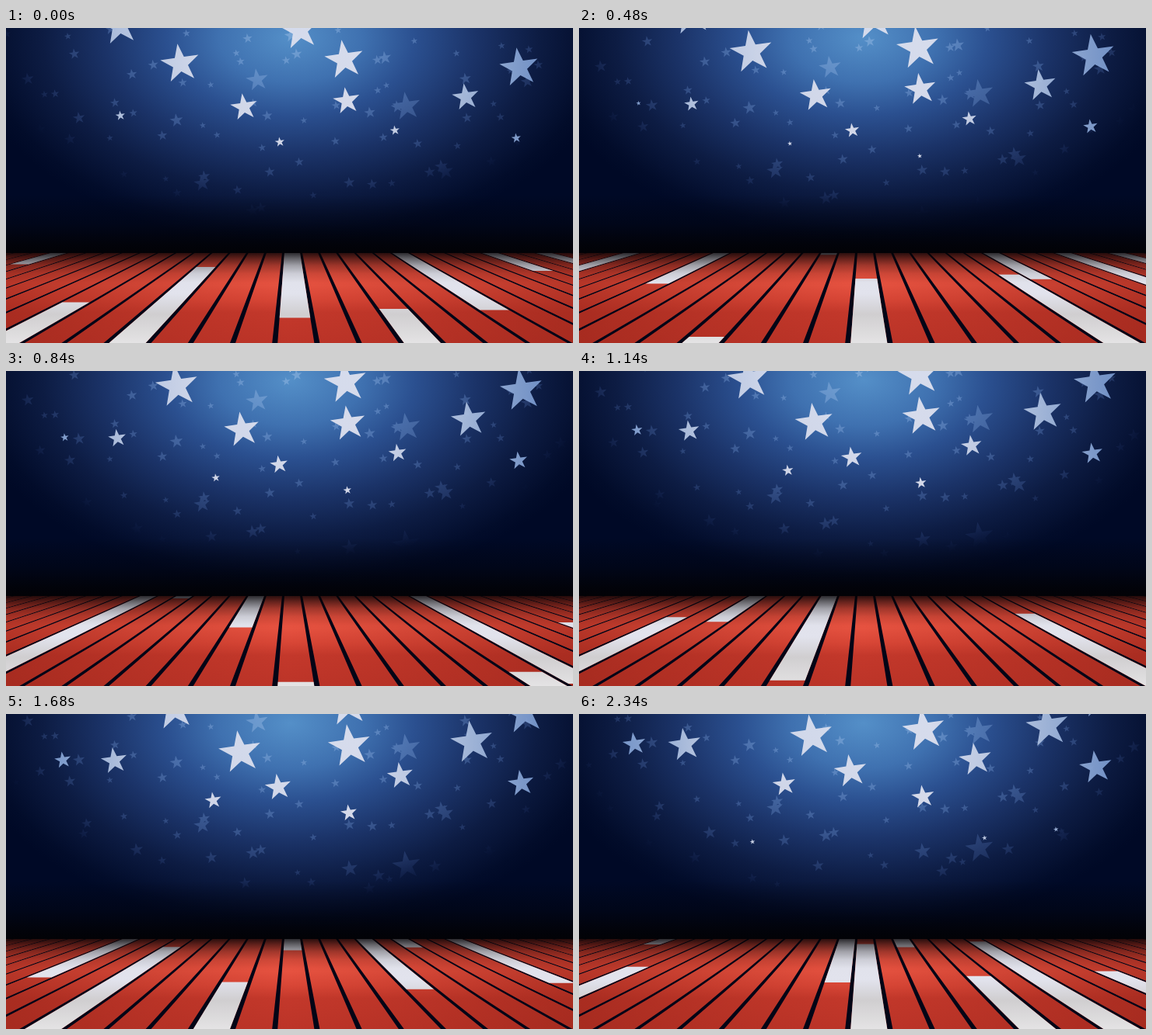
Write an HTML page with a canvas that moves like this. It is 729 by 406 pixels and loops after 2400 ms.

```html
<!DOCTYPE html>
<html lang="en">
<head>
<meta charset="utf-8">
<title>Stars and planks</title>
<style>
html, body { margin: 0; width: 100%; height: 100%; overflow: hidden; background: #000; }
canvas { display: block; }
</style>
</head>
<body>
<canvas id="stage" width="729" height="406"></canvas>
<script>
const W = 729, H = 406, LOOP = 2400, STEP = 60, HORIZON = 290;
const ctx = document.getElementById('stage').getContext('2d');

// Bright stars come in waves; each wave starts the loop at its own size.
const brightWaves = [
  { size: 26, at: [[146, -3], [378, 3], [224, 46], [435, 41], [660, 51]] },
  { size: 18, at: [[306, 102], [438, 94], [591, 89]] },
  { size: 6.5, at: [[147, 113], [352, 147], [500, 132], [656, 142]] },
  { size: 0, at: [[78, 112], [273, 164], [437, 180]] },
  { size: -12, at: [[511, 233], [602, 222], [234, 238]] }
];

// White tiles leave the horizon in evenly spaced waves; each entry is a lane.
const tileWaves = [
  [3, -7], [-4], [0, 6], [11, 14, -13], [-8, 7], [-2],
  [-6], [4, 9, -9], [0, 6], [-1], [2, -11]
];
const TILE = { first: -1311, every: 352, stagger: 40, length: 750 };

function seeded(seed) {
  return () => (seed = (seed * 16807) % 2147483647) / 2147483647;
}

// Small stars are scattered one per cell; a few large ones are placed.
function scatterStars() {
  const random = seeded(2024);
  const stars = [[323, 67, 15], [515, 101, 19], [515, 252, 19], [252, 200, 11], [565, 185, 11], [442, 256, 11]];
  const cols = 12, rows = 9;
  for (let i = 0; i < cols * rows; i++) {
    const x = (i % cols + random()) * W / cols;
    const y = (Math.floor(i / cols) + random()) * 300 / rows;
    stars.push([x, y, 4.2 + 4.8 * random() ** 1.3]);
  }
  return stars;
}
const faintStars = scatterStars();

function blend(gradient, stops) {
  for (const [at, color] of stops) gradient.addColorStop(at, color);
  return gradient;
}
const radial = (r, stops) => blend(ctx.createRadialGradient(0, 0, 0, 0, 0, r), stops);
const vertical = (y0, y1, stops) => blend(ctx.createLinearGradient(0, y0, 0, y1), stops);
const horizontal = stops => blend(ctx.createLinearGradient(0, 0, W, 0), stops);

const skyFill = radial(265, [
  [0, 'rgb(84,143,200)'], [0.22, 'rgb(63,113,176)'], [0.38, 'rgb(43,80,144)'],
  [0.57, 'rgb(27,51,104)'], [0.76, 'rgb(13,28,67)'], [0.94, 'rgb(2,12,42)'], [1, 'rgb(0,9,38)']
]);
const duskFill = vertical(215, HORIZON, [
  [0, 'rgba(2,2,6,0)'], [0.5, 'rgba(2,2,6,.4)'], [0.85, 'rgba(2,2,6,.88)'], [1, 'rgb(2,2,6)']
]);
const faintFill = radial(245, [
  [0, 'rgba(155,190,230,.5)'], [0.35, 'rgba(125,162,215,.45)'], [0.65, 'rgba(95,130,190,.4)'],
  [0.85, 'rgba(75,105,170,.28)'], [1, 'rgba(50,75,150,0)']
]);
const brightFill = horizontal([
  [0, 'rgba(110,150,215,.85)'], [0.1, 'rgba(140,170,218,.9)'], [0.2, 'rgba(188,203,230,.92)'],
  [0.34, 'rgba(216,221,237,.95)'], [0.62, 'rgba(222,225,239,.95)'], [0.8, 'rgba(178,196,226,.92)'],
  [0.91, 'rgba(136,166,215,.9)'], [1, 'rgba(110,150,215,.85)']
]);
const redFill = vertical(HORIZON, H, [
  [0, 'rgb(222,74,57)'], [0.36, 'rgb(230,82,64)'], [0.52, 'rgb(216,70,54)'],
  [0.66, 'rgb(195,56,43)'], [1, 'rgb(188,52,40)']
]);
const sideFill = horizontal([
  [0, 'rgba(155,38,27,.65)'], [0.35, 'rgba(165,42,30,.18)'], [0.5, 'rgba(170,45,30,0)'],
  [0.65, 'rgba(165,42,30,.18)'], [1, 'rgba(155,38,27,.65)']
]);
const whiteFill = vertical(HORIZON, H, [
  [0, 'rgb(222,223,232)'], [0.45, 'rgb(226,227,237)'], [0.68, 'rgb(208,206,208)'], [1, 'rgb(228,227,228)']
]);
const shadowFill = vertical(HORIZON, 328, [
  [0, 'rgba(4,2,5,.82)'], [0.2, 'rgba(4,2,5,.55)'], [0.42, 'rgba(4,2,5,.29)'],
  [0.7, 'rgba(4,2,5,.09)'], [1, 'rgba(4,2,5,0)']
]);

function addStar(x, y, r) {
  for (let i = 0; i < 10; i++) {
    const a = (-98 + i * 36) * Math.PI / 180;
    const d = i % 2 ? r * 0.39 : r;
    ctx[i ? 'lineTo' : 'moveTo'](x + d * Math.cos(a), y + d * Math.sin(a));
  }
  ctx.closePath();
}

function fillPath(fill) {
  ctx.fillStyle = fill;
  ctx.fill();
}

// Fills the current path with a radial gradient stretched to an ellipse.
function fillOval(fill, y) {
  ctx.save();
  ctx.translate(366, y);
  ctx.scale(1.58, 1);
  fillPath(fill);
  ctx.restore();
}

function laneX(line, y) {
  const p = (y - HORIZON) / (H - HORIZON);
  return 368 + 4.8 * p + (line - 0.5) * (23.1 + 31.1 * p);
}

function addPlank(lane, top, bottom) {
  const left = lane + 0.065, right = lane + 0.935;
  ctx.moveTo(laneX(left, top), top);
  ctx.lineTo(laneX(right, top), top);
  ctx.lineTo(laneX(right, bottom), bottom);
  ctx.lineTo(laneX(left, bottom), bottom);
  ctx.closePath();
}

// Constant speed in depth, projected onto the screen.
function floorY(age) {
  const depth = 0.01094 - 8.6e-6 * Math.max(0, age);
  return depth < 0.00482 ? H : Math.min(H, 198.6 + 1 / depth);
}

function drawSky(t) {
  ctx.beginPath();
  ctx.rect(0, 0, W, H);
  fillOval(skyFill, 12);
  ctx.beginPath();
  for (const [x, y, r] of faintStars) addStar(x, y - 0.0337 * t, r);
  fillOval(faintFill, 0);
  ctx.fillStyle = duskFill;
  ctx.fillRect(0, 215, W, H - 215);

  for (const { size, at } of brightWaves) {
    const r = Math.min(28.5, size + 0.0066 * t);
    if (r <= 0) continue;
    for (const [x, y] of at) {
      const drift = 12 * Math.sin((x - 380) / 120) * t / LOOP;
      ctx.beginPath();
      addStar(x + drift, y - 0.0313 * t, r);
      fillPath(brightFill);
    }
  }
}

function drawFloor(t) {
  ctx.fillStyle = 'rgb(2,5,22)';
  ctx.fillRect(0, HORIZON, W, H - HORIZON);
  ctx.beginPath();
  for (let lane = -17; lane <= 17; lane++) addPlank(lane, HORIZON, H);
  fillPath(redFill);
  fillPath(sideFill);

  ctx.beginPath();
  tileWaves.forEach((lanes, wave) => lanes.forEach((lane, i) => {
    const age = t - TILE.first - wave * TILE.every - i * TILE.stagger;
    const top = floorY(age - TILE.length), bottom = floorY(age);
    if (bottom > top) addPlank(lane, top, bottom);
  }));
  fillPath(whiteFill);

  ctx.fillStyle = shadowFill;
  ctx.fillRect(0, HORIZON, W, 38);
}

function render(now) {
  const t = Math.floor((now % LOOP) / STEP) * STEP;
  drawSky(t);
  drawFloor(t);
  requestAnimationFrame(render);
}
render(performance.now());
</script>
</body>
</html>
```
